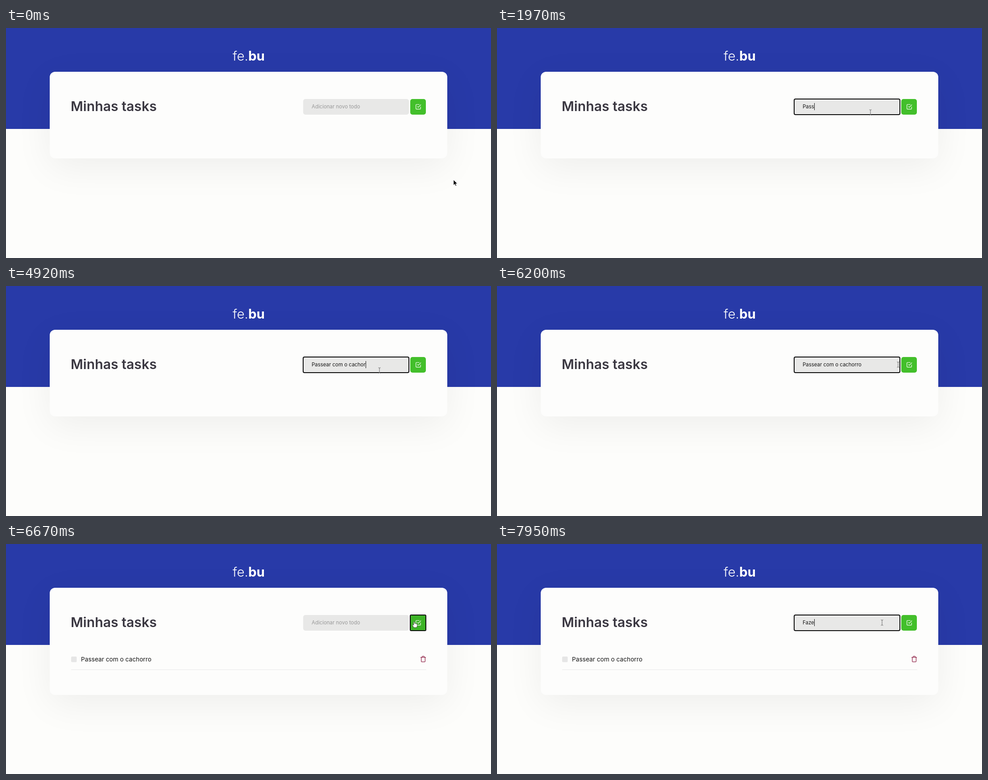
Recreate the animation shown at these times as an HTML page. Size 1087x515 px, loop 7990 ms.

```html
<!DOCTYPE html>
<html lang="pt">
<head>
<meta charset="utf-8">
<title>Minhas tasks</title>
<style>
  html, body { margin: 0; width: 100%; height: 100%; overflow: hidden; background: #fdfdfb; }
  svg { display: block; width: 1087px; height: 515px; }
  text { font-family: Inter, "Open Sans", sans-serif; white-space: pre; }
  .icon { fill: none; stroke-width: 2; stroke-linecap: round; stroke-linejoin: round; }
  .outline { fill: none; stroke: #0b0b0b; stroke-width: 2; }
  #shadow { filter: blur(42px); opacity: .06; }
</style>
</head>
<body>
<svg viewBox="0 0 1087 515">
  <rect width="1087" height="515" fill="#fdfdfb"/>
  <rect width="1087" height="226" fill="#283aa8"/>
  <text x="508" y="73" font-size="29.5" font-weight="300" fill="#fff">fe.<tspan font-weight="700">bu</tspan></text>

  <rect id="shadow" x="98" y="118" width="891" height="194"/>
  <rect id="card" x="98" y="98" width="891" height="194" rx="12" fill="#fdfdfc"/>
  <text x="145" y="186" font-size="30.2" font-weight="600" fill="#3a3741">Minhas tasks</text>

  <rect x="666" y="159" width="237" height="35" rx="5" fill="#e8e8e7"/>
  <rect id="inputFocus" class="outline" x="666" y="159" width="237" height="35" rx="3"/>
  <text id="entry" x="685" y="180" font-size="11.45"></text>
  <rect id="caret" y="168" width="1" height="16" fill="#111"/>

  <rect id="button" x="906" y="159" width="35" height="35" rx="5"/>
  <rect id="buttonFocus" class="outline" x="906" y="159" width="35" height="35" rx="2"/>
  <path class="icon" stroke="#fff" transform="translate(917 169.5) scale(.58)"
    d="M9 11l3 3L22 4M21 12v7a2 2 0 0 1-2 2H5a2 2 0 0 1-2-2V5a2 2 0 0 1 2-2h11"/>

  <g id="item">
    <rect x="146" y="252" width="12.5" height="12.5" rx="2" fill="#e6e6e6"/>
    <text x="168" y="263" font-size="13.7" fill="#151515">Passear com o cachorro</text>
    <path class="icon" stroke="#8f2145" transform="translate(927.6 250.2) scale(.62)"
      d="M3 6h18M19 6v14a2 2 0 0 1-2 2H7a2 2 0 0 1-2-2V6m3 0V4a2 2 0 0 1 2-2h4a2 2 0 0 1 2 2v2"/>
    <path d="M146 281.5H942" stroke="#e8e8e8"/>
  </g>

  <g id="cursor">
    <path id="arrow" d="M0 0V12l2.8-2.6 1.9 4.2 2-.9-1.9-4h3.8z" fill="#000" stroke="#fff" stroke-width=".7"/>
    <path id="beam" d="M-2.5-6H-1L0-5 1-6H2.5M0-5V5M-2.5 6H-1L0 5 1 6H2.5" fill="none" stroke="#666"/>
    <path id="hand" d="M-2.2 1V-4.3Q-1.2-6 0-4.3V-.8Q1.2-1.8 2.1-.5 3.2-1.2 4 .1 5.6-.4 5.7 1.3V4.5L4.3 8H-1.9L-5 3.2Q-5.3 1.3-3.7 1.6L-2.2 3z"
      fill="#fff" stroke="#333" stroke-width=".8" stroke-linejoin="round"/>
  </g>
</svg>
<script>
const LOOP = 7990, ADDED = 6670;
const $ = id => document.getElementById(id);
const show = (id, on) => $(id).setAttribute('visibility', on ? 'visible' : 'hidden');
const set = (id, attrs) => Object.entries(attrs).forEach(([k, v]) => $(id).setAttribute(k, v));

const phrases = [
  { text: 'Passear com o cachorro', focus: 730, blur: 6500, keys: [
    980, 1550, 1850, 1970, 2220, 2450, 2630, 2770, 2870, 2980, 3130,
    3230, 3430, 3570, 3720, 3800, 4170, 4390, 4700, 4920, 5020, 5130] },
  { text: 'Faze', focus: 7210, blur: LOOP, keys: [7400, 7520, 7730, 7950] }
];

// Pointer stops: time, x, y
const stops = [
  [0, 1003, 340], [60, 1003, 340], [500, 837, 189], [6060, 837, 189], [6200, 899, 176],
  [6400, 916, 179], [6870, 916, 179], [7050, 866, 174], [7180, 863, 176], [LOOP, 863, 176]
];

function pointer(t) {
  const i = stops.findIndex(s => s[0] > t);
  const [t0, x0, y0] = stops[i - 1], [t1, x1, y1] = stops[i];
  const p = (t - t0) / (t1 - t0), e = p * p * (3 - 2 * p);
  return [x0 + (x1 - x0) * e, y0 + (y1 - y0) * e];
}

function draw(t) {
  const added = t >= ADDED;
  const { text, focus, blur, keys } = phrases[+added];
  const typed = keys.filter(k => k <= t).length;
  const focused = t >= focus && t < blur;
  const entry = $('entry');
  entry.textContent = typed ? text.slice(0, typed) : 'Adicionar novo todo';
  entry.setAttribute('fill', typed ? '#151515' : '#999');
  show('inputFocus', focused);
  const lastInput = typed ? keys[typed - 1] : focus;
  show('caret', focused && (t - lastInput) % 1200 < 600);
  set('caret', { x: Math.round(685 + (typed ? entry.getComputedTextLength() : 0)) });

  show('item', added);
  const height = added ? 240 : 194;
  set('card', { height });
  set('shadow', { height });

  const [x, y] = pointer(t);
  const inRow = y > 159 && y < 194;
  const overInput = inRow && x > 666 && x < 903;
  const overButton = inRow && x > 906 && x < 941;
  set('cursor', { transform: `translate(${Math.round(x)} ${Math.round(y)})` });
  show('beam', overInput);
  show('hand', overButton);
  show('arrow', !overInput && !overButton);
  set('button', { fill: overButton ? '#3db327' : '#43bf2b' });
  show('buttonFocus', t >= 6500 && t < 7210);
}

function tick() {
  draw(performance.now() % LOOP);
  requestAnimationFrame(tick);
}
tick();
</script>
</body>
</html>
```
